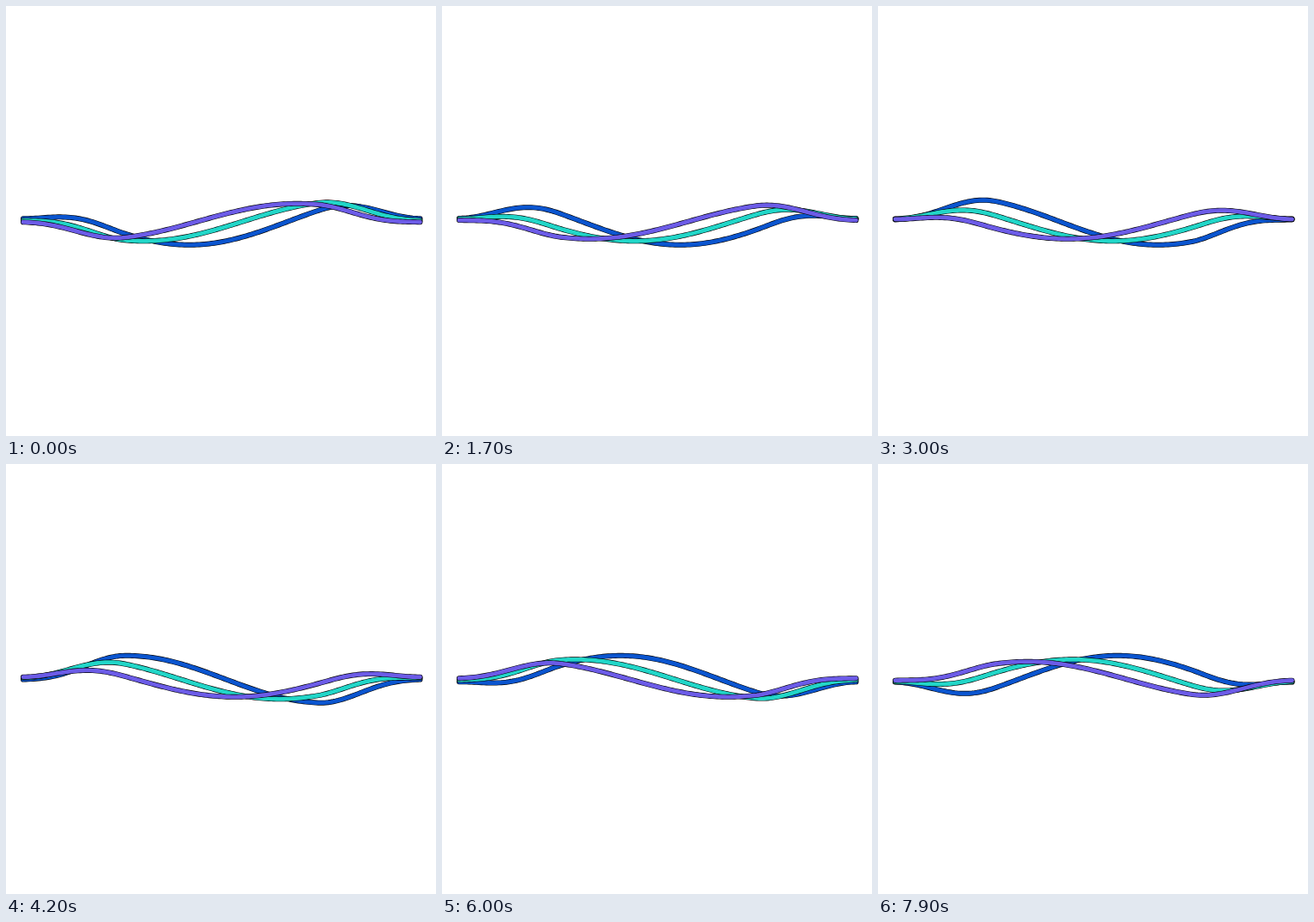
An HTML page with a canvas for the animation above (8000 ms loop, 500 by 500 pixels).

```html
<!DOCTYPE html>
<html lang="en">
<head>
<meta charset="utf-8">
<title>Waving strands</title>
<style>
  html, body { margin: 0; width: 100%; height: 100%; overflow: hidden; background: #fff; }
  canvas { display: block; }
</style>
</head>
<body>
<canvas id="stage" width="500" height="500"></canvas>
<script>
const ctx = document.getElementById('stage').getContext('2d');
const LOOP = 8000, STEP = 100;
const PERIOD = 12300, OFFSET = 7150, DELAY = 1400;
const LEFT = 20, RIGHT = 481.5, MIDDLE = 250.3;

const strands = [
  { color: '#0b55cf', height: 27.5 },
  { color: '#22d6c8', height: 23 },
  { color: '#6c5ce7', height: 20.5 }
];

// Swing is small at both ends and full over the middle half
function swing(u) {
  const s = Math.min(1, u / 0.255, (1 - u) / 0.255);
  return 0.13 + 0.87 * s * s * (3 - 2 * s);
}

// One wavelength spans the strand and travels to the right
function strandPath(height, t) {
  const path = new Path2D();
  for (let i = 0; i <= 160; i++) {
    const u = i / 160;
    const angle = 2 * Math.PI * ((t - OFFSET) / PERIOD - u);
    path.lineTo(LEFT + u * (RIGHT - LEFT), MIDDLE + height * swing(u) * Math.cos(angle));
  }
  return path;
}

function stroke(path, color, width) {
  ctx.strokeStyle = color;
  ctx.lineWidth = width;
  ctx.stroke(path);
}

function draw(t) {
  ctx.clearRect(0, 0, 500, 500);
  ctx.lineCap = 'round';
  ctx.lineJoin = 'round';
  strands.forEach(({ color, height }, i) => {
    const path = strandPath(height, t - i * DELAY);
    stroke(path, '#000', 6);
    stroke(path, color, 4.8);
  });
}

const start = performance.now();
function tick() {
  const t = (performance.now() - start) % LOOP;
  draw(Math.floor(t / STEP) * STEP);
  requestAnimationFrame(tick);
}
tick();
</script>
</body>
</html>
```
